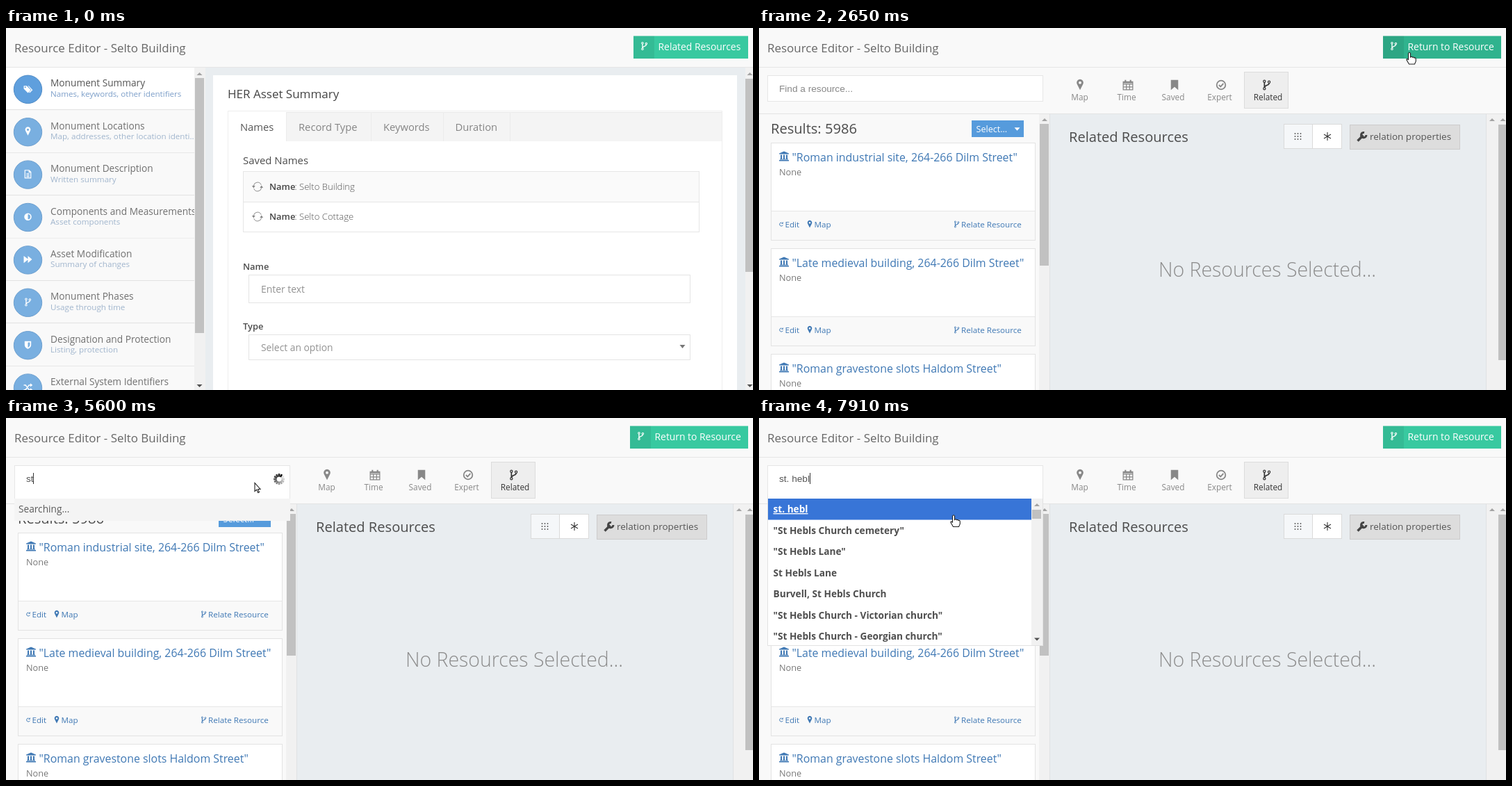
Animation, 1075 px wide and 521 px high, one loop 8000 ms. Source, as an HTML page:

```html
<!DOCTYPE html>
<html lang="en">
<head>
<meta charset="utf-8">
<title>Resource Editor</title>
<style>
html, body { margin: 0; width: 100%; height: 100%; overflow: hidden; background: #f9f9f9; }
svg { display: block; }
text { font-family: "Open Sans", sans-serif; white-space: pre; }
.arial { font-family: "Liberation Sans", Arial, sans-serif; }
</style>
</head>
<body>
<svg id="stage" width="1075" height="521" viewBox="0 0 1075 521"></svg>
<script>
const rect = (x, y, w, h, fill, attrs = '') =>
  `<rect x="${x}" y="${y}" width="${w}" height="${h}" fill="${fill}" ${attrs}/>`;
const box = (x, y, w, h, fill, line) => rect(x + .5, y + .5, w - 1, h - 1, fill, `stroke="${line}"`);
const text = (s, x, y, size, fill, weight = 400, attrs = '') =>
  `<text x="${x}" y="${y}" font-size="${size}" fill="${fill}" font-weight="${weight}" ${attrs}>${s}</text>`;
const group = (id, body, attrs = '') => `<g id="${id}" ${attrs}>${body}</g>`;
const tri = (x, y, dir, fill) => `<path d="M${x - 4} ${y - 2 * dir}h8l-4 ${4 * dir}z" fill="${fill}"/>`;

// Glyphs are centred on 0,0 in a box of about 14 units.
const dot = (x, y, r) => `<circle cx="${x}" cy="${y}" r="${r}" stroke="none"/>`;
const ring = (x, y) => `<circle cx="${x}" cy="${y}" r="1.5" fill="none" stroke-width="1.2"/>`;
const line = (d, w) => `<path d="${d}" fill="none" stroke-width="${w}"/>`;
const fill = d => `<path d="${d}" stroke="none" fill-rule="evenodd"/>`;
const glyphs = {
  branch: ring(-3, -5) + ring(-3, 5) + ring(3.4, -4) + line('M-3-3.5V3.5M3.4-2.5C3.4 1-3 0-3 3.5', 1.6),
  tag: fill('M-7-5H-2L5 2 0 7-7 0zM-5.6-2.6a1.2 1.2 0 1 0 2.4 0a1.2 1.2 0 1 0-2.4 0zM0-5H1.5L8 2 3 7 2 6 6 2z'),
  pin: fill('M0 7L-4-1A4.6 4.6 0 1 1 4-1zM-1.9-3a1.9 1.9 0 1 0 3.8 0a1.9 1.9 0 1 0-3.8 0z'),
  doc: line('M-5-6.5H2L5-3.5V6.5H-5zM2-6.5V-3H5M-2.5-.5H2.5M-2.5 2H2.5M-2.5 4.3H2.5', 1.4),
  half: line('M0-5.2A5.2 5.2 0 1 1 0 5.2A5.2 5.2 0 1 1 0-5.2z', 1.9) + fill('M0-5A5 5 0 0 0 0 5z'),
  forward: fill('M-7-6L0-.6V-6L7 0 0 6V.6L-7 6z'),
  shield: fill('M-5.5-6H5.5V0C5.5 4 2 6 0 7-2 6-5.5 4-5.5 0zM0-4V4.8C2 3.5 3.5 2 3.5 0V-4z'),
  shuffle: line('M-7-4H-4L2 4H6M-7 4H-4L2-4H6', 1.8) + fill('M4-7L8-4 4-1zM4 1L8 4 4 7z'),
  bank: fill('M0-7L7-4V-3H-7V-4zM-5-2H-3V4H-5zM-1-2H1V4H-1zM3-2H5V4H3zM-6 4H6V5H-6zM-7 5.5H7V7H-7z'),
  calendar: line('M-6.5-4.5H6.5V6.5H-6.5zM-6.5-1H6.5M-6.5 2.7H6.5M-2.2-1V6M2.2-1V6', 1.2) + line('M-6.5-3.5H6.5M-3.5-7V-3M3.5-7V-3', 2),
  bookmark: fill('M-5-7H5V7L0 2.5-5 7z'),
  check: line('M0-6A6 6 0 1 1 0 6A6 6 0 1 1 0-6zM-3 0L-.7 2.3 3.2-2', 1.7),
  cycle: line('M-6-1.5A6 6 0 0 1 5.5-3M6 1.5A6 6 0 0 1-5.5 3', 1) + fill('M-8.5-1.5H-3.5L-6 2zM8.5 1.5H3.5L6-2z'),
  edit: line('M1-4.5A4.6 4.6 0 1 0 4.5 2', 1.7) + fill('M5-6.5V-1.5H0z'),
  grid: [-4, 0, 4].map(x => [-4, 0, 4].map(y => dot(x, y, .9)).join('')).join(''),
  star: line('M0-6V6M-5-3L5 3M-5 3L5-3', 1.1),
  wrench: line('M-6 6L2-2', 3.4) + line('M3.5-6A3.7 3.7 0 1 0 6.4-2.5', 3)
};
const icon = (name, x, y, color, scale = 1) =>
  `<g transform="translate(${x} ${y}) scale(${scale})" fill="${color}" stroke="${color}">${glyphs[name]}</g>`;

const topButton = (x, label, id) =>
  rect(x, 11.5, 1068 - x, 32.5, '#38c9a0', `id="${id}"`) +
  rect(x, 11.5, 30, 32.5, '#000', 'opacity=".07"') +
  icon('branch', x + 15.5, 26, '#fff', .85) + text(label, x + 35.5, 32, 13.9, '#fff');

function editor() {
  const items = [
    ['Monument Summary', 'Names, keywords, other identifiers', 'tag'],
    ['Monument Locations', 'Map, addresses, other location identi..', 'pin'],
    ['Monument Description', 'Written summary', 'doc'],
    ['Components and Measurements', 'Asset components', 'half'],
    ['Asset Modification', 'Summary of changes', 'forward'],
    ['Monument Phases', 'Usage through time', 'branch'],
    ['Designation and Protection', 'Listing, protection', 'shield'],
    ['External System Identifiers', 'Link to other databases', 'shuffle']
  ];
  const side = items.map(([title, sub, glyph], i) => {
    const y = i * 61.4;
    return rect(0, 57 + y, 271, 61, i ? '#f9f9f9' : '#fff') + rect(0, Math.round(117.4 + y), 271, 1, '#e2e2e2') +
      `<circle cx="31.5" cy="${88.3 + y}" r="20.2" fill="${i ? '#79afe0' : '#5f9fdd'}" stroke="${i ? '#6c9fcf' : '#4f8bc6'}"/>` +
      icon(glyph, 31.5, 87.5 + y, '#fff', .85) +
      text(title, 64, 84.3 + y, 13.7, i ? '#707070' : '#555') +
      text(sub, 64, 98.7 + y, 11.65, i ? '#a0b5cd' : '#7d9fc9');
  }).join('');
  const tabs = [['Names', 337, 403], ['Record Type', 421, 525], ['Keywords', 543, 629], ['Duration', 646.5, 725]]
    .map(([s, x, end], i) => text(s, x, 148, 14.75, i ? '#858585' : '#555') + rect(end, 121, 1, 42, '#ebebeb')).join('');
  const saved = ['Building', 'Cottage'].map((s, i) =>
    icon('cycle', 362, 228.5 + 43 * i, '#888', .95) +
    text('Name', 379, 233 + 43 * i, 12.9, '#444', 600) +
    text(': Selto ' + s, 415.5, 233 + 43 * i, 13.1, '#555', 300)).join('');
  return rect(287, 57, 777, 464, '#e9edf0') + rect(298, 68, 754, 453, '#fff') +
    `<g clip-path="url(#side)">${side}</g>` +
    rect(271, 57, 16, 464, '#f1f1f1') + rect(272, 72, 13, 367, '#c1c1c1') +
    tri(278.5, 66, -1, '#a3a3a3') + tri(278.5, 515, 1, '#505050') +
    rect(1064, 57, 11, 464, '#f1f1f1') + rect(1064, 73, 11, 278, '#c1c1c1', 'id="thumb"') +
    tri(1070.5, 66, -1, '#a3a3a3') + tri(1070.5, 515, 1, '#505050') +
    text('HER Asset Summary', 319, 101, 17, '#444') +
    rect(319, 119, 1, 402, '#eee') + rect(1030, 119, 1, 402, '#eee') + rect(319, 119, 712, 1, '#eee') +
    rect(403, 121, 627, 42, '#f4f4f4') + rect(403, 121, 627, 1, '#e8e8e8') + tabs +
    text('Saved Names', 341, 196, 14.9, '#4c4c4c') +
    box(341, 206, 657, 45, '#fafafa', '#e6e6e6') + box(341, 250, 657, 44, '#fff', '#e6e6e6') + saved +
    text('Name', 341, 347.5, 12.9, '#4c4c4c', 600) + box(349, 355, 636, 41, '#fff', '#e4e4e4') +
    text('Enter text', 367, 381, 13.9, '#929292') +
    text('Type', 341, 434, 12.9, '#4c4c4c', 600) + box(349, 441, 636, 37, '#fff', '#e4e4e4') +
    text('Select an option', 367, 465, 13.85, '#929292') + tri(973.5, 458.5, 1.2, '#777') +
    topButton(903, 'Related Resources', 'related');
}

const tools = [['Map', 461.5, 'pin'], ['Time', 529, 'calendar'], ['Saved', 596, 'bookmark'],
  ['Expert', 663, 'check'], ['Related', 732.5, 'branch']];

function search() {
  const toolbar = tools.map(([s, x, glyph], i) => {
    const on = i === 4, color = on ? '#333' : '#888';
    return rect(x - 31.5, 63, 63, 53, '#f3f3f3', `id="hover${i}" visibility="hidden"`) +
      (on ? box(698, 63, 64, 53, '#eee', '#dcdcdc') : '') +
      group('tool' + i, icon(glyph, x + (i && !on ? 2 : on ? -2 : .5), 82, color, 1.05) +
        text(s, x, 104, 11.8, color, 400, 'text-anchor="middle"'));
  }).join('');
  const cards = ['Roman industrial site, 264-266 Dilm Street', 'Late medieval building, 264-266 Dilm Street',
    'Roman gravestone slots Haldom Street'].map((s, i) => {
    const y = 152 * i, blue = '#3f78b4';
    return `<g transform="translate(0 ${y})">` + box(17, 165, 381, 141, '#fff', '#e3e3e3') +
      rect(18, 263, 379, 42, '#f9f9f9') + rect(18, 263, 379, 1, '#e6e6e6') +
      icon('bank', 36, 184.5, blue) + text(`"${s}"`, 47.5, 191.5, 15.9, blue) +
      text('None', 29, 212, 12.7, '#777') +
      icon('edit', 32, 282.5, blue, .55) + text('Edit', 37.5, 286.5, 11.65, blue) +
      icon('pin', 73, 282.5, blue, .72) + text('Map', 79.5, 286.5, 11.65, blue) +
      icon('branch', 284.5, 282.5, blue, .7) + text('Relate Resource', 291, 286.5, 11.65, blue) + '</g>';
  }).join('');
  return rect(0, 123, 1075, 398, '#f9f9f9') + box(12, 68, 397, 38, '#fff', '#e6e6e6') +
    text('Find a resource...', 29, 91.5, 13.65, '#888', 400, 'class="arial" id="hint"') + toolbar +
    text('Results: 5986', 17, 151.5, 20.1, '#4c4c4c') +
    rect(306, 133, 75, 24, '#569bdc') + text('Select...', 312.5, 149.5, 12.6, '#fff') + tri(371.5, 145.5, 1.1, '#fff') +
    cards + rect(403, 124, 15, 397, '#f1f1f1') + rect(404, 138, 13, 204, '#c1c1c1') + tri(411, 132, -1, '#a3a3a3') +
    rect(1047, 124, 28, 397, '#f1f1f1') + rect(1064, 139, 11, 339, '#c1c1c1') +
    tri(1055, 132, -1, '#a3a3a3') + tri(1070.5, 132, -1, '#a3a3a3') +
    box(418, 123, 629, 400, '#e9edf0', '#dfe2e4') + rect(0, 123, 1075, 1, '#e3e3e3') +
    text('Related Resources', 446, 163.5, 20.1, '#4c4c4c') +
    box(755, 138, 42, 36, '#f5f7f9', '#dadada') + box(796, 138, 43, 36, '#fff', '#dadada') +
    icon('grid', 775.5, 156, '#555') + icon('star', 818, 156, '#333') +
    box(850, 139, 159, 36, '#ddd', '#ccc') + icon('wrench', 867.5, 156.5, '#444') +
    text('relation properties', 879, 160.5, 13.5, '#555') +
    text('No Resources Selected...', 575, 357.5, 28.45, '#8c8c8c', 300) +
    topButton(898, 'Return to Resource', 'back');
}

function results(id, rows, marked) {
  const u = s => `<tspan text-decoration="underline">${s}</tspan>`;
  return group(id, rows.map((s, i) =>
    text(s.replace(/_(.*?)_/, (m, w) => u(w)), 20.5, 136 + 30.55 * i, 13.65, marked && !i ? '#fff' : '#4f4f4f', 700)).join(''),
    'clip-path="url(#list)"');
}

function dropdown() {
  const first = ['_st_', '_st_', '_St_ Calthups', '"_St_ Verdolas with St Yorn church, Medwort"',
    '"Cemetery, _St_ Dolms Church, Dilm St"', '"_St_ Dolms Church Hall, St Dolms Street"',
    '"_St_ Aubellunes cemetery, St Gumdrels Street."'];
  const second = ['_st. hebl_', '"St Hebls Church cemetery"', '"St Hebls Lane"', 'St Hebls Lane',
    'Burvell, St Hebls Church', '"St Hebls Church - Victorian church"', '"St Hebls Church - Georgian church"'];
  const spokes = Array.from({ length: 12 }, (_, i) =>
    `<path d="M0-3.5V-8" stroke="#111" stroke-width="2.6" opacity="${.12 + i * .08}" transform="rotate(${30 * i})"/>`).join('');
  return box(12, 68, 397, 60, '#fff', '#e6e6e6') +
    group('message', rect(12, 116, 397, 32, '#f4f4f4') + text('', 18, 136, 13.7, '#5c5c5c', 400, 'id="note"')) +
    group('lists', box(12, 110, 397, 218, '#fff', '#e2e2e2') + rect(13, 109, 395, 7, '#fff') +
      rect(392, 116, 16, 211, '#f1f1f1') + rect(393, 132, 13, 13, '#c1c1c1') +
      tri(400, 125, -1, '#a3a3a3') + tri(400, 318.5, 1, '#505050') +
      rect(13, 116, 379, 30.5, '#3875d7', 'id="mark"') +
      group('listA', results('rowsA', first, false) +
        text('(Language)', 43.5, 166, 11.7, '#666', 400, 'font-style="italic"')) +
      results('rowsB', second, true)) +
    text('', 29, 91.5, 13.65, '#555', 400, 'class="arial" id="typed"') + rect(0, 79, 1, 16, '#333', 'id="caret"') +
    group('spinner', spokes);
}

const stage = document.getElementById('stage');
stage.innerHTML =
  `<defs><clipPath id="side">${rect(0, 57, 271, 464)}</clipPath><clipPath id="list">${rect(13, 116, 379, 211)}</clipPath></defs>` +
  rect(0, 0, 1075, 521, '#f9f9f9') + rect(0, 56, 1075, 1, '#e6e6e6') +
  text('Resource Editor - Selto Building', 12, 34.5, 16.95, '#666') +
  group('editor', editor()) + group('search', search()) + group('dropdown', dropdown()) +
  group('pointer',
    group('hand', '<path d="M-1.5 1.5Q0-1 1.5 1.5V7Q3.5 5.5 4.5 7.3 6.3 6.3 7 8 9 7.3 9.3 9.5V13L7.5 17H-.5L-4 11Q-4.5 8.5-1.5 10.5z"/>') +
    group('arrow', '<path d="M0 0V12L2.7 9.6 4.7 14 6.5 13.2 4.6 9H8z"/>') +
    group('beam', '<path d="M-3-6H3M-3 6H3M0-6V6" fill="none"/>'),
    'fill="#fff" stroke="#222" stroke-width="1.1"');

const el = {};
stage.querySelectorAll('[id]').forEach(e => el[e.id] = e);
const show = (id, on) => { el[id].style.display = on ? '' : 'none'; };

// Pointer tip: time, x, y
const path = [[1240, 1067, 190], [1960, 983, 28], [2040, 983, 28], [2110, 936, 35], [3480, 936, 35], [3920, 547, 95],
  [4290, 361, 95], [4380, 360, 94.5], [4540, 358, 93.5], [7580, 358, 93.5], [7910, 280, 139.5]];
const keys = [5380, 5600, 5820, 5960, 6110, 6260, 6410, 6560];

function tipAt(t) {
  const i = path.findIndex(p => p[0] > t);
  if (i < 1) return (i ? path[path.length - 1] : path[0]).slice(1);
  const [a, b] = [path[i - 1], path[i]], k = (t - a[0]) / (b[0] - a[0]);
  return [a[1] + (b[1] - a[1]) * k, a[2] + (b[2] - a[2]) * k];
}

function draw(t) {
  const [x, y] = tipAt(t), [lagX, lagY] = tipAt(t - 70);
  const second = t >= 2650, open = t >= 4540, listed = t >= 5670, found = t >= 6720;
  show('editor', !second);
  show('search', second);
  show('dropdown', open);
  show('hint', !open);

  const onButton = t >= 1240 && x >= (second ? 898 : 903) && x < 1064 && y < 44;
  el.related.setAttribute('fill', onButton ? '#30b38e' : '#38c9a0');
  el.back.setAttribute('fill', onButton ? '#30b38e' : '#38c9a0');
  el.thumb.setAttribute('fill', t >= 1240 && x > 1063 ? '#a8a8a8' : '#c1c1c1');
  tools.forEach(([, cx], i) => {
    const over = second && i < 4 && lagY > 63 && lagY < 116 && Math.abs(lagX - cx) < 32;
    el['hover' + i].setAttribute('visibility', over ? 'visible' : 'hidden');
    el['tool' + i].style.filter = over ? 'brightness(.45)' : '';
  });

  const onTool = second && y > 63 && x > 430 && x < 764;
  const beam = second && !open && x < 409;
  const hand = onButton || onTool || (found && y > 116);
  show('pointer', t >= 1240);
  show('hand', hand);
  show('beam', beam);
  show('arrow', !hand && !beam);
  el.pointer.setAttribute('transform', `translate(${x} ${y})`);

  if (!open) return;
  show('message', !listed);
  el.note.textContent = t < 5380 ? 'Please enter 1 or more character' : 'Searching...';
  show('lists', listed);
  show('listA', !found);
  show('rowsB', found);
  show('mark', found || t < 5820);
  el.typed.textContent = 'st. hebl'.slice(0, keys.filter(k => k <= t).length);
  el.caret.setAttribute('x', Math.round(28.7 + el.typed.getComputedTextLength()));
  show('caret', !(t >= 5080 && t < 5380) && !(t >= 7010 && t < 7560));
  show('spinner', t >= 5380 && t < 6790);
  el.spinner.setAttribute('transform', `translate(393 88) rotate(${30 * Math.floor(t / 75)})`);
}

const start = performance.now();
function tick() {
  draw((performance.now() - start) % 8000);
  requestAnimationFrame(tick);
}
tick();
</script>
</body>
</html>
```
